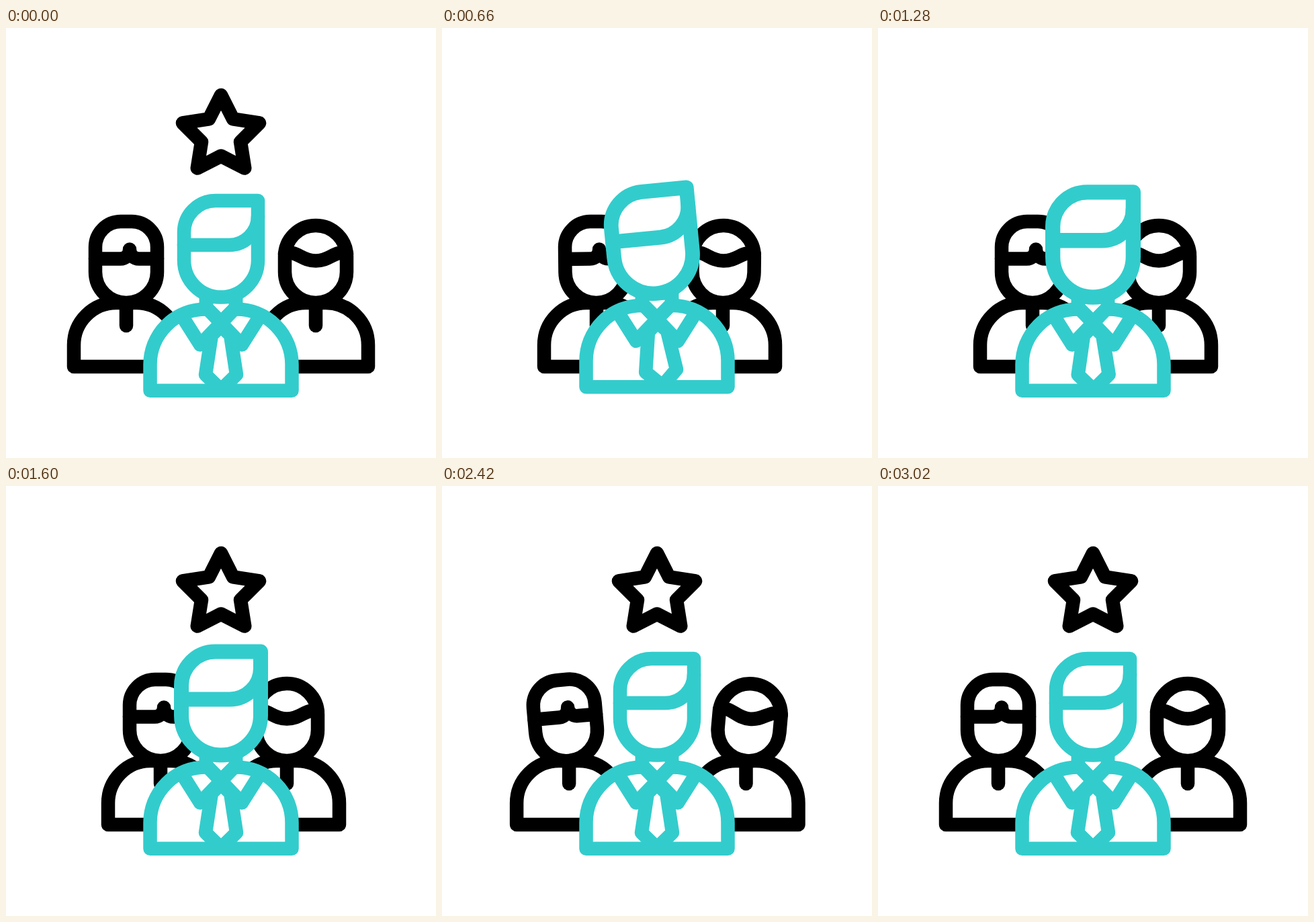
An HTML page for the animation above (3220 ms loop, 640 px wide and 640 px high).

```html
<!DOCTYPE html>
<html lang="en">
<head>
<meta charset="utf-8">
<title>Team leader</title>
<style>
html, body { margin: 0; height: 100%; overflow: hidden; background: #fff; }
svg { display: block; width: 100vw; height: 100vh; fill: #fff; stroke: #000; stroke-width: 20.5; stroke-linecap: round; stroke-linejoin: round; }
.line { fill: none; }
#boss { stroke: #3cc; }
</style>
</head>
<body>
<svg viewBox="0 0 640 640">
  <clipPath id="sky"><rect width="640" height="250"/></clipPath>
  <g clip-path="url(#sky)"><path id="star"/></g>
  <g id="left">
    <g id="torso">
      <path d="M101 504V472A63 63 0 0 1 164 409H194A63 63 0 0 1 257 472V504Z"/>
      <path class="line" d="M179 409V443"/>
    </g>
    <g id="leftHead">
      <path d="M133 363V326A38 38 0 0 1 171 288H187A38 38 0 0 1 225 326V363A46 46 0 0 1 133 363Z"/>
      <path class="line" d="M133 343.5H170A14 14 0 0 0 184 329.5A14 14 0 0 0 198 343.5H225"/>
    </g>
  </g>
  <g id="right">
    <use href="#torso" x="282"/>
    <g id="rightHead">
      <path d="M415 363V340A46 46 0 0 1 507 340V363A46 46 0 0 1 415 363Z"/>
      <path class="line" d="M415 336C433 330 439 346.5 461 346.5S489 330 507 336"/>
    </g>
  </g>
  <g id="boss">
    <path d="M214.5 539.7V501A82.5 82.5 0 0 1 297 418.5H343A82.5 82.5 0 0 1 425.5 501V539.7Z"/>
    <path d="M298 400V416L320 438L342 416V400Z"/>
    <path class="line" d="M342 400V416L289 471.5L264 432M298 400V416L351 471.5L376 432"/>
    <path id="tie" d="M320 443.5L306 457L297 516L320 538.5L343 516L334 457Z"/>
    <g id="bossHead">
      <path d="M312 257H375V345.5A55 55 0 0 1 265 345.5V304A47 47 0 0 1 312 257Z"/>
      <path class="line" d="M265 323H332A43 43 0 0 0 375 280"/>
    </g>
  </g>
</svg>
<script>
const LOOP = 3220;
const { PI, cos, sin, min, max } = Math;

const place = (id, transform) =>
  document.getElementById(id).setAttribute('transform', transform);

const points = Array.from({ length: 10 }, (_, i) => {
  const r = i % 2 ? 30.5 : 60, a = (i * 36 - 90) * PI / 180;
  return [320 + r * cos(a), 160 + r * sin(a)];
});
document.getElementById('star').setAttribute('d', 'M' + points.join('L') + 'Z');

function draw(t) {
  // ramp eases from 0 to 1 between two times; pulse goes to 1 and back.
  const ramp = (from, to) => (1 - cos(PI * min(1, max(0, (t - from) / (to - from))))) / 2;
  const pulse = (from, to) => ramp(from, (from + to) / 2) - ramp((from + to) / 2, to);

  // The star flies off the top, drops behind the leader and rises again.
  const starY = -247 * ramp(235, 700) + 527 * ramp(700, 1200) - 280 * ramp(1200, 1590);
  place('star', `translate(0 ${starY}) rotate(${360 * ramp(235, 1198)} 320 154.5)`);

  // The others close in, then step apart, heads leaning outwards.
  const gather = ramp(0, 500) - ramp(1957, 2614);
  const lean = 6.2 * pulse(0, 740) + 5.2 * pulse(2060, 2860);
  place('left', `translate(${51 * gather} 0)`);
  place('right', `translate(${-43 * gather} 0)`);
  place('leftHead', `rotate(${-lean} 179 409)`);
  place('rightHead', `rotate(${lean} 461 409)`);

  // The leader ducks, then jumps with a nod and a swelling head.
  const hop = 12 * (pulse(0, 800) - pulse(400, 1200));
  const nod = -7.5 * pulse(400, 1200);
  const grow = 1 + 0.088 * (ramp(400, 800) - ramp(1450, 2000));
  const sway = -5 * (ramp(0, 400) - ramp(850, 1400));
  place('boss', `translate(0 ${hop})`);
  place('tie', `rotate(${sway} 320 446)`);
  place('bossHead', `translate(320 400) rotate(${nod}) scale(${grow}) translate(-320 -400)`);
}

const start = performance.now();
function frame() {
  draw((performance.now() - start) % LOOP);
  requestAnimationFrame(frame);
}
frame();
</script>
</body>
</html>
```
